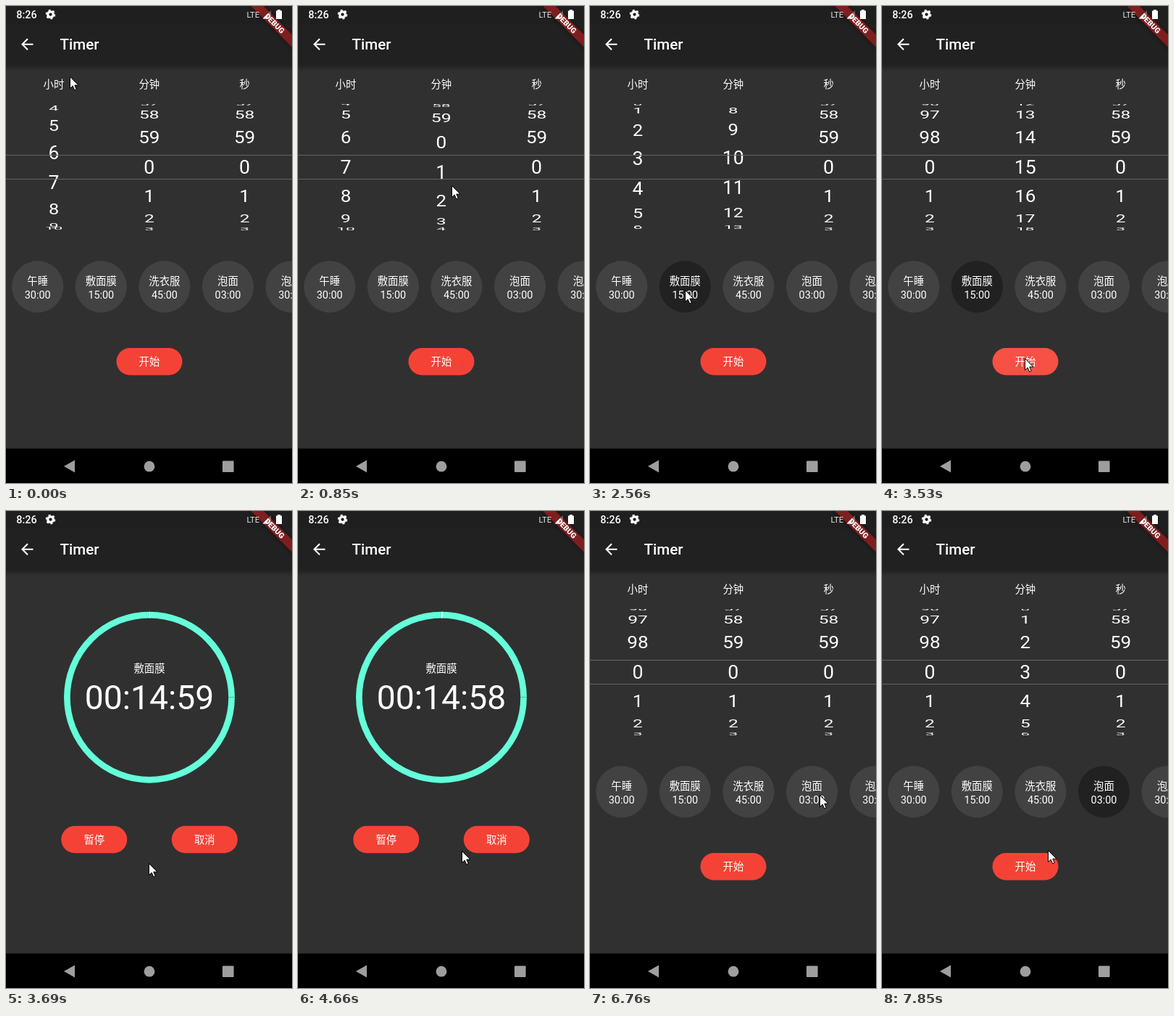
Animation of 395x657 px, one loop 8000 ms. Source, as an HTML page:

```html
<!DOCTYPE html>
<html lang="zh-CN">
<head>
<meta charset="utf-8">
<title>Timer</title>
<style>
html, body { margin: 0; width: 100%; height: 100%; overflow: hidden; background: #303030; }
svg { display: block; width: 395px; height: 657px; }
text { font-family: Roboto, 'Noto Sans CJK SC', 'Noto Sans CJK', sans-serif; fill: #fff; font-size: 14.4px; }
.mid text { text-anchor: middle; }
.wheel text { font-size: 26.7px; }
</style>
</head>
<body>
<svg viewBox="0 0 395 657">
  <defs>
    <linearGradient id="shade" x2="0" y2="1">
      <stop offset="0" stop-opacity=".28"/>
      <stop offset="1" stop-opacity="0"/>
    </linearGradient>
    <clipPath id="drum"><rect y="135" width="395" height="174"/></clipPath>
  </defs>
  <rect width="395" height="657" fill="#303030"/>

  <g id="picker" class="mid">
    <g id="wheels" class="wheel" clip-path="url(#drum)"></g>
    <path d="M0 205.5H395M0 238.5H395" stroke="#646464"/>
  </g>

  <g id="running" class="mid">
    <circle cx="198" cy="256.7" r="113.6" fill="none" stroke="#64ffda" stroke-width="8.7"/>
    <path d="M307 256.5H316" stroke="#4fb89f" stroke-width=".9"/>
    <path id="spent" fill="none" stroke="#fff" stroke-width="8.7"/>
    <text x="198" y="221.5">敷面膜</text>
    <text id="clock" x="198" y="273.3" style="font-size:46.3px"></text>
  </g>

  <rect width="395" height="82" fill="#212121"/>
  <rect width="395" height="24.5" fill="#1f1f1f"/>
  <rect y="82" width="395" height="7" fill="url(#shade)"/>
  <path transform="translate(16.9 40.5) scale(1.0286)" fill="#fff" d="M20 11H7.83l5.59-5.59L12 4l-8 8 8 8 1.41-1.41L7.83 13H20v-2z"/>
  <text x="74.5" y="60" style="font-size:20.57px;font-weight:500">Timer</text>

  <g transform="translate(395.7 -.7) rotate(45) scale(1.0286)">
    <rect x="-45" y="28" width="90" height="12" fill="#7f1e1e" style="filter:drop-shadow(0 0 3px #0008)"/>
    <text y="37.6" text-anchor="middle" style="font-size:10.2px;font-weight:900">DEBUG</text>
  </g>
  <text x="14.3" y="17" style="font-weight:500">8:26</text>
  <g transform="translate(61.5 11.6)" fill="none" stroke="#fff">
    <circle r="3.8" stroke-width="3.2"/>
    <circle r="5.6" stroke-width="2.4" pathLength="12" stroke-dasharray="1"/>
  </g>
  <text x="332.5" y="16" style="font-size:11.2px;fill:#e4e4e4">LTE</text>
  <path d="M354.5 17.5H366V6z" fill="#fff" opacity=".3"/>
  <path d="M354.5 17.5H361V11z" fill="#fff"/>
  <path d="M373 6.5h2V5h4v1.5h2V18h-8z" fill="#fff"/>

  <rect y="609.5" width="395" height="48"/>
  <g fill="#9e9e9e">
    <path d="M80 634L95 625.5V642.5z"/>
    <circle cx="198" cy="634.2" r="7.4"/>
    <rect x="299" y="626.4" width="15.6" height="15.6" rx="1"/>
  </g>

  <path id="cursor" d="M0 0V16L3.7 12.6 6.2 18.3 8.7 17.2 6.3 11.6H11.5Z" fill="#fff" stroke="#000" stroke-linejoin="round"/>
</svg>
<script>
const LOOP = 8000, STEP = 120;
const RED = '#f44336', RED_DOWN = '#f75045';
const $ = id => document.getElementById(id);

function add(parent, tag, attrs, label) {
  const el = document.createElementNS('http://www.w3.org/2000/svg', tag);
  for (const k in attrs) el.setAttribute(k, attrs[k]);
  if (label) el.textContent = label;
  return parent.appendChild(el);
}

function button(page, x, y, label) {
  const box = add($(page), 'rect', { x: x - 45.5, y, width: 91, height: 37.4, rx: 18.7, fill: RED });
  add($(page), 'text', { x, y: y + 24.4 }, label);
  return box;
}

const startBox = button('picker', 198, 471, '开始');
button('running', 121.8, 433.8, '暂停');
const cancelBox = button('running', 274.3, 433.8, '取消');

const chips = ['午睡 30:00', '敷面膜 15:00', '洗衣服 45:00', '泡面 03:00', '泡脚 30:00'].map((label, i) => {
  const x = 43.7 + 87.6 * i;
  const disc = add($('picker'), 'circle', { cx: x, cy: 386.6, r: 35.6 });
  label.split(' ').forEach((line, k) => add($('picker'), 'text', { x, y: 384.3 + 18.7 * k }, line));
  return disc;
});

const [hours, minutes, seconds] = ['小时', '分钟', '秒'].map((name, i) => {
  const x = 66 + 131.8 * i;
  add($('picker'), 'text', { x, y: 113.2 }, name);
  const rows = Array.from({ length: 8 }, () => add($('wheels'), 'text', { y: 9.5 }));
  return { x, size: i ? 60 : 99, rows };
});

// Each move: [start, end, ...goal]
const hourMoves = [[0, 550, 7], [2120, 2850, 0]];
const minuteMoves = [[560, 1560, 5], [2120, 2850, 15], [5900, 5900, 0], [7150, 7780, 3]];
const cursorMoves = [
  [100, 600, 205, 288], [600, 1270, 232, 126], [1270, 1900, 131, 391], [2600, 3250, 197, 485],
  [4240, 5140, 261, 447], [6200, 6700, 317, 391], [7330, 7780, 229, 467]
];

function glide(from, moves, t) {
  let at = from;
  for (const [start, end, ...goal] of moves) {
    if (t < start) break;
    const u = t >= end ? 1 : (t - start) / (end - start);
    const e = u * u * (3 - 2 * u);
    at = at.map((v, k) => v + (goal[k] - v) * e);
  }
  return at;
}

// Rows lie on a cylinder seen from the front
function drawWheel({ x, size, rows }, pos) {
  const first = Math.floor(pos) - 3;
  rows.forEach((row, i) => {
    const off = first + i - pos, angle = off * 0.4887, cos = Math.cos(angle);
    const shown = off > -3.3 && off < 3.6;
    row.style.display = shown ? '' : 'none';
    row.textContent = (first + i + size) % size;
    const sx = 1 / (1.2 - 0.2 * cos), sy = Math.max(0.17, Math.abs(cos));
    row.setAttribute('transform', `translate(${x} ${221.4 + 86 * Math.sin(angle)}) scale(${sx} ${sy})`);
  });
}

function drawPicker(t, held) {
  drawWheel(hours, glide([6.48], hourMoves, held)[0]);
  drawWheel(minutes, glide([0], minuteMoves, held)[0]);
  drawWheel(seconds, 0);
  const picked = t >= 7170 ? 3 : t >= 2200 && t < 3690 ? 1 : -1;
  chips.forEach((disc, i) => disc.setAttribute('fill', i === picked ? '#212121' : '#424242'));
  startBox.setAttribute('fill', t >= 3530 && t < 3690 ? RED_DOWN : RED);
}

function drawRunning(t) {
  const spent = Math.floor((t - 3540) / 1000) + 1;
  const a = spent / 900 * 2 * Math.PI, r = 113.6;
  $('clock').textContent = '00:14:' + (60 - spent);
  $('spent').setAttribute('d', `M198 ${256.7 - r}A${r} ${r} 0 0 1 ${198 + r * Math.sin(a)} ${256.7 - r * Math.cos(a)}`);
  cancelBox.setAttribute('fill', t >= 5790 ? RED_DOWN : RED);
}

function draw(t) {
  // Motion refreshes in even steps
  const held = Math.floor((t - 100) / STEP) * STEP + 100;
  const running = t >= 3690 && t < 5910;
  $('picker').style.display = running ? 'none' : '';
  $('running').style.display = running ? '' : 'none';
  if (running) drawRunning(t);
  else drawPicker(t, held);
  const [x, y] = glide([88, 97], cursorMoves, held).map(Math.round);
  $('cursor').setAttribute('transform', `translate(${x + 0.5} ${y + 0.5})`);
}

const begin = performance.now();
function frame() {
  draw((performance.now() - begin) % LOOP);
  requestAnimationFrame(frame);
}
draw(0);
requestAnimationFrame(frame);
</script>
</body>
</html>
```
